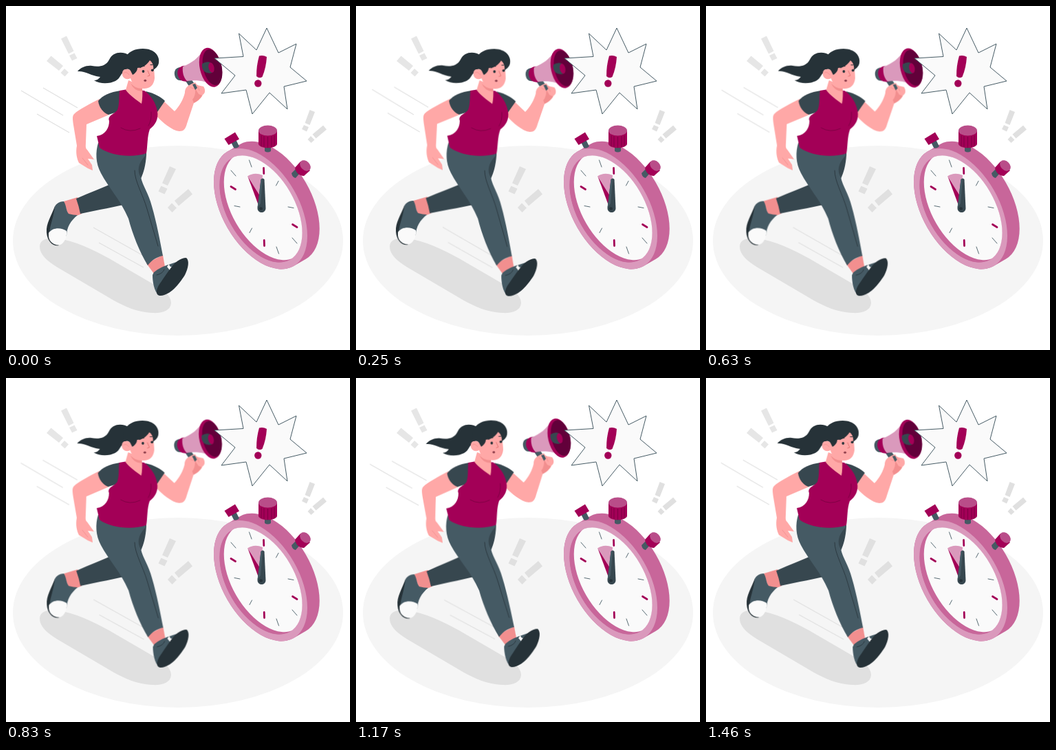
Write an HTML page that moves like this. It is 500x500 px and loops after 1.5 s.

```html
<!DOCTYPE html>
<html lang="en">
<head>
<meta charset="utf-8">
<title>Runner and stopwatch</title>
<style>
html, body { margin: 0; height: 100%; overflow: hidden; background: #fff; }
svg { display: block; width: 100vw; height: 100vh; }
#runner { transform-origin: 169px 241px; }
.main { fill: #a30057; }
.mid { fill: #c8669a; }
.cap { fill: #b94d89; }
.pale { fill: #da99bc; }
.skin { fill: #ffa8a7; }
.blush { fill: #f28f8f; }
.ink { fill: #263238; }
.slate { fill: #455a64; }
.deep { fill: #37474f; }
.line { fill: none; stroke: #263238; stroke-linecap: round; }
.speed { fill: none; stroke: #e0e0e0; stroke-width: 1.1; }
</style>
</head>
<body>
<svg viewBox="0 0 500 500">
  <ellipse cx="250" cy="341" rx="240" ry="138" fill="#f5f5f5"/>
  <path fill="#e0e0e0" d="M49 350C49 339 60 336 75 338C99 341 127 354 150 367L224 410C235 417 240 425 240 432C239 443 227 447 212 446C191 445 173 437 155 427L75 380C60 371 49 361 49 350Z"/>

  <g fill="#e6e6e6">
    <path d="M80 47.500L88 43.500L98.500 65.500L91 69.500ZM92 72L99.500 68.500L103.500 76L96 79.500Z"/>
    <path d="M65.500 72.500L83 87L77 94L59 80ZM85 91L91 96.500L85.500 102.500L79.500 97Z"/>
  </g>
  <g fill="#e0e0e0">
    <path d="M238 233L247 237L235 261L227 257.500ZM225.500 261.500L234.500 265.500L230.500 273.500L221.500 269.500Z"/>
    <path d="M265 266L271 273.500L251 290.500L245 283ZM241 286.500L248 293.500L241.500 300L235 293Z"/>
    <path d="M441.500 151L449 154L441.500 173L434.500 170ZM433 173L440 176L437 182.500L430 179Z"/>
    <path d="M461 173.500L466 179.500L450.500 192.500L445.500 186.500ZM443 189L448.500 194.500L443.500 199L438.500 194Z"/>
  </g>

  <g id="watch">
    <g transform="matrix(.866 .5 0 1 370 294.700)">
      <path d="M0 0L20.500 -20.500" stroke="#c8669a" stroke-width="157" stroke-linecap="round"/>
      <circle class="pale" r="78.500"/>
      <clipPath id="hole"><circle cx=".5" r="69.500"/></clipPath>
      <g clip-path="url(#hole)">
        <circle class="mid" cx=".5" r="70"/>
        <circle cx="8.500" cy="-8" r="70" fill="#fafafa"/>
      </g>
    </g>
    <path class="slate" d="M327 198L334 194L339 204Q335 208 331 206ZM376 202H385V211Q380.500 214 376 211ZM415 243L421 237L427 243L421 250Q416 249 415 243Z"/>
    <path class="main" d="M317.500 193L333 183.500L339 193.500L323.500 202Z"/>
    <path class="main" d="M367 181V201C370 208 391 208 394 201V181Z"/>
    <path d="M371 188V204M375 189V205M380.500 190V206M386 189V205M390 188V204" stroke="#7c0042"/>
    <ellipse class="cap" cx="380.500" cy="181" rx="13.500" ry="7.500"/>
    <path class="main" d="M428 226L420 235C421 242 426 247 433 247L442 239Z"/>
    <ellipse class="cap" cx="435" cy="232" rx="6.500" ry="9" transform="rotate(-45 435 232)"/>
    <g id="ticks" fill="none"></g>
    <path class="pale" d="M370 291L351 247.500Q361 241 373 246Z"/>
    <path class="main" d="M352 249L366 287L370 288L369 276Z"/>
    <path class="deep" d="M370.500 252Q373 249 375.500 252L377.500 294C377 302 366 302 365.500 294Z"/>
    <path class="slate" d="M370.500 252L373 251L370 287L365.500 293Z"/>
    <circle class="ink" cx="370.500" cy="294.500" r="2.300"/>
  </g>

  <g id="runner">
    <path class="speed" d="M22 123L83 159M54 119L104 148M45 157L92 184M127 322L198 362M135 344L200 380"/>

    <!-- far leg -->
    <path class="blush" d="M84 284L104 278L110 302L92 309Z"/>
    <path class="deep" d="M204 205L204 216C203 232 200 242 196 251L182 287C160 291 133 297 108 302Q106 291 102 280C122 271 142 264 160 255L190 205Z"/>
    <path class="slate" d="M84 284C77 284 71 288 70 295C69 306 62 314 60 327C60 334 61 340 66 343L88 334C88 322 94 312 104 304Q98 304 91 302C87 297 88 290 84 284Z"/>
    <path class="ink" d="M71 291C66 305 58 316 59 329C60 343 69 350 77 348L64 335C61 324 69 311 71 291Z"/>
    <path fill="#fafafa" d="M62 330C68 321 81 322 88 327C89 336 85 344 79 347C72 349 63 344 62 335Z"/>

    <!-- near leg -->
    <path class="blush" d="M204 374L228 362L231 379L215 389Z"/>
    <path class="slate" d="M134 199C130 212 130 228 138 243C149 264 166 281 178 309C184 332 194 357 206 377C212 369 219 365 228 363C224 342 219 315 212 291C207 272 199 262 196 249C190 240 192 228 203 217L204 205Z"/>
    <path class="line" stroke-width=".8" d="M187 239C187 255 199 274 205 295L221 349"/>
    <path class="slate" d="M215 387C222 381 230 378 236 376L248 372L236 400L222 420C215 415 213 400 213 391Z"/>
    <path fill="#fafafa" d="M234 379L237 375Q238 381 243 378L238 384Z"/>
    <path class="ink" d="M238 383C244 373 254 366 262 366C267 370 265 381 260 391C251 405 239 420 225 421C217 421 218 413 222 406C227 399 231 392 238 383Z"/>
    <path class="line" stroke-width=".8" d="M219 391Q228 389 230 383"/>

    <!-- megaphone -->
    <path class="slate" d="M261 109L269 106L278 119L275 123L269 121Z"/>
    <path class="slate" d="M254 89C247 89 244 94 245 100C246 106 250 109 256 108Z"/>
    <path class="main" d="M251 91Q256 86 261 87L266 109Q258 111 253 107C249 102 248 96 251 91Z"/>
    <path class="pale" d="M257 88C270 83 279 76 287 64L304 116C291 109 278 107 263 109C258 104 256 96 257 88Z"/>
    <ellipse class="main" cx="297.500" cy="89.300" rx="15.800" ry="29" transform="rotate(-13 297.500 89.300)"/>
    <ellipse cx="300" cy="89" rx="13.500" ry="26.500" transform="rotate(-13 300 89)" fill="#62003a"/>
    <path class="deep" d="M285 84Q291 80 297 82L300 97Q293 99 288 95Q284 90 285 84Z"/>
    <ellipse class="main" cx="298.500" cy="89.500" rx="4" ry="7.500" transform="rotate(-13 298.500 89.500)"/>

    <!-- arms -->
    <path class="skin" d="M136 135C122 142 105 151 99 157C96 160 97 165 98 173L103 203C101 213 103 222 106 228L119 236L126 239L125 231L119 222L128 223L118 209C115 207 116 202 116 198L117 172L150 158Z"/>
    <path class="line" style="stroke:#f28f8f" stroke-width=".8" d="M111 221L119 231"/>
    <path class="skin" d="M230 139L245 153C252 146 258 135 260 126C260 119 264 116 270 113L275 111L278 115L287 117C290 121 290 127 286 129C283 136 277 139 273 141L263 171C261 179 258 182 252 182C241 181 227 169 217 158L220 145Z"/>
    <path class="blush" d="M275 120L280 128L285 130Q281 137 273 141L271 136Q276 130 275 120Z"/>
    <path class="line" style="stroke:#f28f8f" stroke-width=".8" d="M278 115L281 123M268 118Q272 122 276 118"/>
    <path class="slate" d="M271 114L275 113L278 119L275 122Z"/>
    <path class="deep" d="M203 124C216 127 225 132 231 138L220 154L210 145Z"/>
    <path class="deep" d="M166 123C152 125 140 130 134 138C135 147 141 155 149 158L168 152Z"/>

    <!-- torso and neck -->
    <path class="main" d="M165 123L177 121L201 123C211 130 218 141 220 153C222 164 217 173 209 179C205 190 206 202 204 214C184 221 152 218 136 206L132 189C145 187 150 177 150 167C147 159 158 157 162 151C165 143 164 132 165 123Z"/>
    <path class="line" style="stroke:#7c0042" stroke-width=".9" d="M167 177Q180 185 195 178M211 154Q212 166 207 174"/>
    <path class="skin" d="M178 108L174 122C180 130 189 136 197 142Q199 133 198 116Z"/>
    <path class="blush" d="M181 112C185 117 191 120 198 120L198 124Q186 124 181 112Z"/>

    <!-- head -->
    <path class="ink" d="M180 72C170 65 155 66 150 78C145 88 134 89 125 87C117 86 109 89 104 95C115 94 122 101 137 103C135 106 132 108 128 108C137 114 151 113 159 109C167 105 166 97 175 93Z"/>
    <path class="skin" d="M180 81L212 76C214 83 216 96 216 105C215 115 209 120 201 120C191 120 183 113 181 105C174 109 168 103 169 97C170 91 177 90 181 94Z"/>
    <path class="ink" d="M173 92C168 78 176 62 199 62C216 62 224 73 222 83C221 88 217 91 214 93C215 87 213 82 209 79C204 87 197 90 191 90C191 94 188 98 184 100L181 94C179 91 176 91 173 92Z"/>
    <path class="line" style="stroke:#f28f8f" stroke-width=".8" d="M172 97Q176 95 179 100"/>
    <circle class="ink" cx="199.500" cy="95" r="1.900"/>
    <circle class="ink" cx="212.800" cy="93.300" r="1.900"/>
    <path class="line" stroke-width="1.200" d="M195 89.500Q198 86.500 201 87.500M210 85.500L213 85.500"/>
    <path class="line" style="stroke:#e0706f" stroke-width=".9" d="M206 94L209 101L206 102"/>
    <ellipse cx="202.300" cy="108.300" rx="1.900" ry="1.600" fill="#8f3f4c"/>
  </g>

  <path fill="#fafafa" stroke="#455a64" d="M303 76L345 73.500L338.500 40L364 64L379 32L396 68L422 55L413 89L437 109L404 117L409 150L383 126L358 157L349 122L313 127L333 101Z"/>
  <path class="main" d="M368 72.500Q374 71 379 74Q378 90 372.500 103Q368 106 364 102Q364 86 368 72.500Z"/>
  <circle class="main" cx="366.300" cy="112.500" r="5.200"/>
</svg>
<script>
// Half of the dial marks; the others are their mirror through the dial centre.
const thin = "M353.5 224L357 234M327 239L334 247M396 254.5L392.500 261M410 292L418 293.500";
const bold = "M374.500 235.500L374.800 243.500M327 262.500L333.500 266.500";
const mark = (d, turn, color, width) =>
  `<path d="${d}" transform="rotate(${turn} 375 292)" stroke="${color}" stroke-width="${width}" stroke-linecap="round"/>`;
document.getElementById("ticks").innerHTML = [0, 180].map(turn =>
  mark(thin, turn, "#455a64", 0.9) + mark(bold, turn, "#a30057", 2.8)).join("");

const sway = [[0, 0], [0.25, 1], [0.75, -1], [1, 0]];
document.getElementById("runner").animate(
  sway.map(([offset, deg]) => ({ offset, transform: `rotate(${deg}deg)` })),
  { duration: 1500, iterations: Infinity, easing: "linear" });
</script>
</body>
</html>
```
